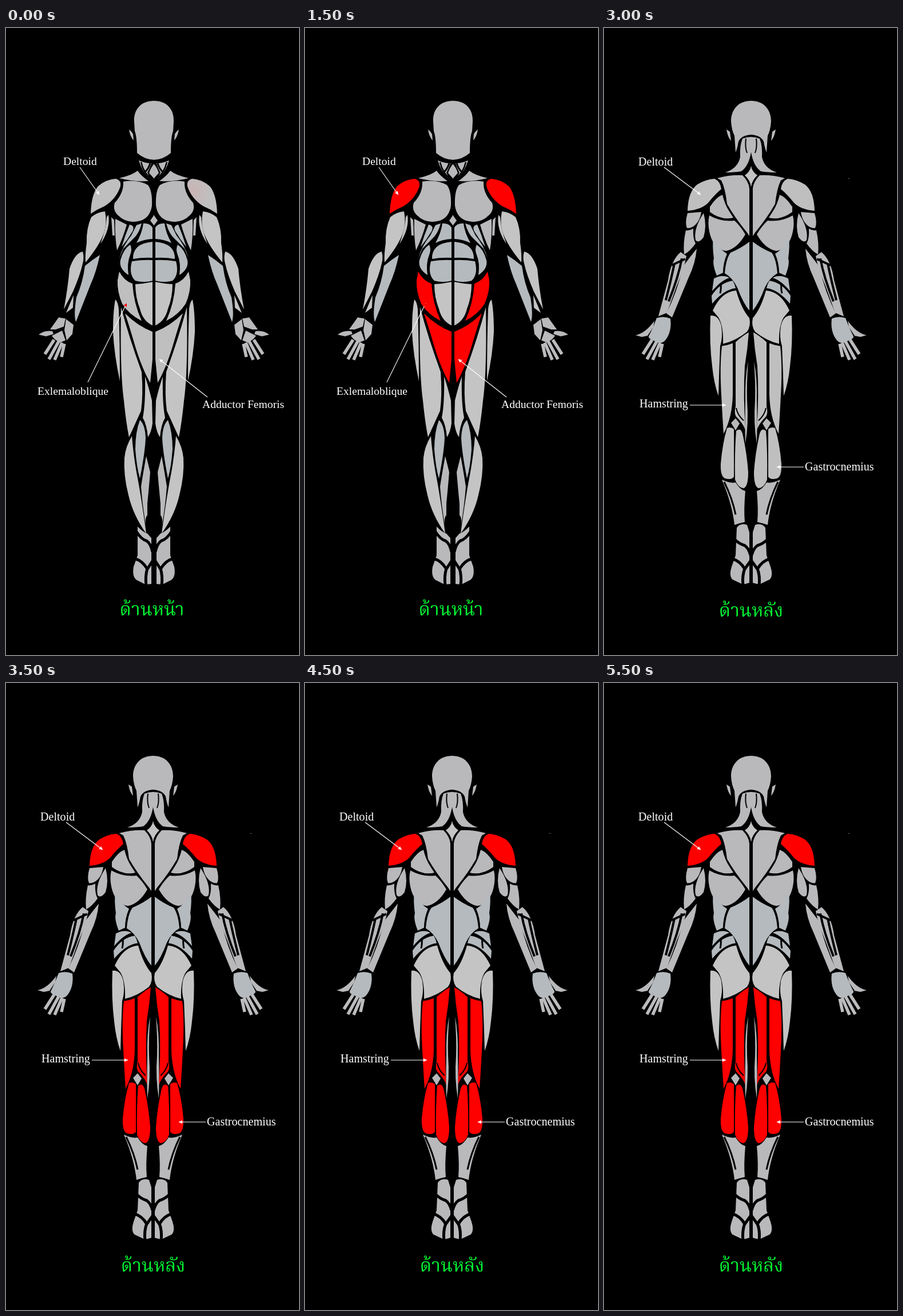
Recreate the animation shown at these times as an HTML page with a canvas. Size 512 px wide and 1094 px high, loop 6 s.

```html
<!DOCTYPE html>
<html lang="th">
<head>
<meta charset="utf-8">
<title>Muscle groups</title>
<style>
html, body { margin: 0; width: 100%; height: 100%; overflow: hidden; background: #000; }
canvas { display: block; width: 100vw; height: 100vh; }
</style>
</head>
<body>
<canvas id="stage" width="512" height="1094"></canvas>
<script>
const ctx = document.getElementById('stage').getContext('2d');
const LOOP = 6000, TURN = 3000, BLINK = 500;
const RED = '#f00', COOL = '#b9b9bc', BLUE = '#b4babe', WARM = '#c4c4c4', REST = '#c0bfc0';

// Each part is one half of the body; it is mirrored about the view's axis.
const fill = (color, d) => ({ color, path: new Path2D(d) });
const hot = d => ({ color: REST, path: new Path2D(d), hot: true });
const line = (width, d, color = '#000') => ({ color, width, path: new Path2D(d) });

const fingers = [
  line(5.5, 'M84 544L68 569M92 547L75 578M98 549L85 579M102 551L97 574', '#bcbcbe')
];

const frontHead = [
  fill(COOL, 'M259 127C236 127 223 142 224 163L225 180Q229 190 229 218Q243 230 259 230Z'),
  fill(COOL, 'M215 177Q219 180 222 185L223 196Q217 190 215 177Z'),
  fill(COOL, 'M232 231Q243 236 254 236Q251 246 247 252L252 264Q238 251 232 231Z'),
  fill(COOL, 'M259 237V263L250 253Q253 243 259 237Z'),
  line(2.5, 'M236 234Q240 252 253 263'),
  line(3, 'M252 236Q249 246 243 251'),
  fill(COOL, 'M198 262Q220 257 230 249Q236 258 249 267Q225 269 198 262Z')
];

const frontArm = [
  hot('M148 324Q149 290 161 276Q175 264 192 263Q202 266 200 276Q193 298 172 311Q160 316 148 324Z'),
  fill(WARM, 'M149 330Q160 321 173 320Q177 340 171 358Q163 380 139 409Q138 395 141 375Q140 350 149 330Z'),
  fill(WARM, 'M179 326Q183 350 165 377Q175 350 176 330Z'),
  fill(WARM, 'M134 390Q137 400 134 411Q130 430 117 460L101 491Q108 455 111 420Q120 393 134 390Z'),
  fill(BLUE, 'M164 396Q158 425 148 447L122 513Q118 500 123 470Q134 445 138 415Q150 405 164 396Z'),
  fill(WARM, 'M118 466L117 488L105 497Z')
];

const frontHand = [
  fill(COOL, 'M77 526L92 505L104 507L101 521L87 526Z'),
  fill(COOL, 'M57 535Q68 527 81 529L83 534L70 538Z'),
  fill(COOL, 'M105 508L118 518L116 534L106 545L102 527Z'),
  fill(COOL, 'M80 537L98 528L104 545L94 549L85 543Z'),
  ...fingers
];

const frontTorso = [
  fill(COOL, 'M205 268Q230 264 248 274Q256 284 255 310Q252 330 236 336Q212 343 196 327Q186 318 190 305Q206 288 205 268Z'),
  fill(COOL, 'M259 326L252 336L259 345Z'),
  fill(COOL, 'M184 330L189 335L190 362L186 362Z'),
  fill(COOL, 'M191 333L211 343Q205 365 194 388Q190 365 191 333Z'),
  fill(BLUE, 'M216 343Q226 345 221 355Q212 370 202 382Q208 362 216 343Z'),
  fill(BLUE, 'M228 344L237 341Q232 360 222 368L205 385L198 402Q204 380 219 362Z'),
  fill(BLUE, 'M217 378Q221 386 217 396Q211 410 214 431Q197 420 200 405Q205 386 217 378Z')
];

const frontAbs = [
  fill(BLUE, 'M240 341Q251 340 256 348V368Q240 369 228 375Q238 357 240 341Z'),
  fill(BLUE, 'M256 373V401Q238 400 222 403Q221 376 256 373Z'),
  fill(BLUE, 'M220 407Q240 404 256 405V441Q241 445 226 441Q214 430 220 407Z'),
  fill(WARM, 'M226 447Q242 446 256 443V519Q239 511 234 490Q226 470 226 447Z'),
  hot('M198 425Q206 441 221 446Q223 480 237 511Q215 500 203 481Q194 460 195 440Z')
];

const frontThigh = [
  hot('M208 498Q230 520 256 530V578L252 619Q238 595 226 556Q217 525 208 498Z'),
  fill(WARM, 'M191 474Q195 476 197 490Q199 550 199 616Q189 570 187 530Q187 495 191 474Z'),
  fill(WARM, 'M201 487Q215 540 237 600Q240 640 236 668Q226 690 215 714Q210 690 206 650Q199 600 201 487Z'),
  fill(WARM, 'M243 608Q249 625 255 650L256 690Q254 705 248 714Q246 692 239 680Q244 655 243 608Z')
];

const frontShin = [
  fill(BLUE, 'M234 684Q243 692 244 715Q243 740 234 786Q228 765 226 735Q226 705 234 684Z'),
  fill(WARM, 'M220 712Q222 740 228 775Q236 815 245 882Q222 850 214 815Q205 780 207 750Q209 730 220 712Z'),
  fill(COOL, 'M245 747L252 775Q250 800 247 830L247 850Q242 855 245 872Q238 830 236 800Q239 780 245 747Z'),
  fill(COOL, 'M230 870Q240 880 247 882L254 890V970L244 971L228 963Q220 957 223 940L230 920Z'),
  line(5, 'M228 879Q236 892 246 895Q253 900 256 914M225 926Q238 929 247 944L256 930M247 943Q243 956 245 973')
];

const backHead = [
  fill(COOL, 'M257.5 127C235 127 222 142 222 163Q223 178 228 188L230 217Q233 210 235 198Q240 187 257.5 186Z'),
  fill(COOL, 'M214 177L220 181L222 197Q216 190 214 177Z'),
  fill(COOL, 'M242 193Q250 190 257.5 190V213Q254 240 240 250Q228 252 212 252Q234 245 238 225Q237 205 242 193Z'),
  line(2, 'M248 193Q246 208 250 218'),
  fill(WARM, 'M257.5 241Q254 252 246 257Q254 264 257.5 277Z')
];

const backArm = [
  hot('M146 319Q147 285 163 273Q178 264 193 263Q203 267 205 281Q195 289 182 305Q170 317 146 319Z'),
  fill(COOL, 'M146 323L170 321Q168 335 160 343Q153 350 145 349Q141 340 146 323Z'),
  fill(COOL, 'M174 323Q180 345 174 365Q165 377 160 370Q156 350 174 323Z'),
  fill(COOL, 'M143 353Q150 354 156 350Q155 367 160 376Q150 390 140 395Q138 375 143 353Z'),
  fill(COOL, 'M134 391L144 398Q140 420 127 450L110 497L95 503L112 440Q117 405 134 391Z'),
  fill(COOL, 'M162 385Q160 410 148 435L119 505L109 498Q128 460 138 416Q150 400 162 385Z'),
  line(4, 'M118 414L142 403M136 402Q130 435 113 477M123 411Q117 440 108 475'),
  fill(BLUE, 'M92 506Q105 502 116 507Q119 530 107 545Q100 553 88 546Q77 542 78 538Q85 525 92 506Z'),
  fill(COOL, 'M55 536Q72 533 88 511L86 522L76 537L66 539Z'),
  ...fingers
];

const backTorso = [
  fill(COOL, 'M198 262Q220 256 242 257Q253 268 254 280V363L250 357Q228 330 215 307Q212 280 205 266Z'),
  fill(COOL, 'M185 312Q196 295 207 291Q211 308 219 320L226 331Q205 336 185 321Z'),
  fill(COOL, 'M184 327Q205 339 228 336Q238 345 247 360Q233 385 213 389Q190 385 184 355Q181 340 184 327Z'),
  fill(BLUE, 'M254 373V493Q243 480 233 453Q224 435 211 428Q213 403 221 392Q240 384 254 373Z'),
  fill(BLUE, 'M191 365Q200 385 215 394Q208 410 208 427L197 432Q189 412 192 402Q189 380 191 365Z'),
  fill(BLUE, 'M192 437Q208 429 219 436Q205 440 189 459Z'),
  fill(BLUE, 'M188 467Q203 444 225 441Q229 448 230 454Q210 456 189 481Z'),
  line(3, 'M204 445Q205 455 203 463'),
  fill(WARM, 'M190 493Q205 460 231 458Q240 490 254 506Q257 520 250 530Q230 546 208 551Q209 520 200 505Z')
];

const backThigh = [
  fill(WARM, 'M186 502Q200 500 205 520Q208 540 203 555Q201 600 200 642Q192 620 189 590Q184 550 186 502Z'),
  hot('M206 555Q215 554 225 550V640Q224 680 209 708Q207 680 205 640Q202 590 206 555Z'),
  hot('M230 548Q242 537 253 531Q251 560 246 590Q243 640 247 701Q243 690 231 678Q227 672 230 660Z'),
  line(2, 'M231 663Q233 675 244 685'),
  fill(COOL, 'M252 582Q249 620 250 650Q253 690 247 725Q246 690 247 650Q246 610 252 582Z'),
  fill(COOL, 'M222 689L230 681L237 690L230 702Z')
];

const backShin = [
  hot('M215 698Q222 695 227 700V783Q223 789 212 786Q203 783 204 760Q207 725 215 698Z'),
  hot('M231 703Q240 695 243 712Q250 745 252 775Q252 800 244 803Q234 802 229 788Q228 740 231 703Z'),
  fill(COOL, 'M206 788Q220 795 230 793Q238 806 247 808Q244 840 246 862Q236 864 228 867Q224 830 206 788Z'),
  line(3, 'M210 792Q224 820 230 849'),
  fill(COOL, 'M232 872Q238 863 250 867L254 880V968L243 971L224 962Q218 955 223 940L230 920Z'),
  line(5, 'M228 892Q236 900 246 903Q253 908 256 920M224 926Q238 930 246 944L256 930M246 943Q241 956 243 973')
];

const front = {
  axis: 258.5, size: 19.6, title: 'ด้านหน้า', titleX: 255, titleY: 1025,
  parts: [frontHead, frontArm, frontHand, frontTorso, frontAbs, frontThigh, frontShin].flat(),
  labels: [
    { text: 'Deltoid', at: [100, 239], from: [129, 243], to: [163, 291] },
    { text: 'Exlemaloblique', at: [55, 640], from: [143, 618], to: [211, 480], tip: RED },
    { text: 'Adductor Femoris', at: [343, 663], from: [352, 644], to: [268, 578] }
  ]
};
const back = {
  axis: 257, size: 20.1, title: 'ด้านหลัง', titleX: 257, titleY: 1027,
  parts: [backHead, backArm, backTorso, backThigh, backShin].flat(),
  labels: [
    { text: 'Deltoid', at: [60, 240], from: [105, 243], to: [169, 291] },
    { text: 'Hamstring', at: [62, 662], from: [150, 658], to: [213, 658] },
    { text: 'Gastrocnemius', at: [351, 772], from: [349, 766], to: [302, 766] }
  ]
};

function drawPart(part, lit) {
  const color = part.hot && lit ? RED : part.color;
  if (part.width) {
    ctx.lineWidth = part.width;
    ctx.strokeStyle = color;
    ctx.stroke(part.path);
  } else {
    ctx.fillStyle = color;
    ctx.fill(part.path);
  }
}

function drawArrow([x0, y0], [x1, y1], tip) {
  const angle = Math.atan2(y1 - y0, x1 - x0);
  ctx.strokeStyle = '#fff';
  ctx.lineWidth = 1.1;
  ctx.beginPath();
  ctx.moveTo(x0, y0);
  ctx.lineTo(x1, y1);
  ctx.stroke();
  ctx.save();
  ctx.translate(x1, y1);
  ctx.rotate(angle);
  ctx.fillStyle = tip;
  ctx.beginPath();
  ctx.moveTo(0, 0);
  ctx.lineTo(-6, -3);
  ctx.lineTo(-6, 3);
  ctx.fill();
  ctx.restore();
}

// Faint blush on the resting right shoulder.
function drawBlush() {
  const glow = ctx.createRadialGradient(192, 285, 0, 192, 285, 34);
  glow.addColorStop(0, 'rgba(225,150,150,.28)');
  glow.addColorStop(1, 'rgba(225,150,150,0)');
  ctx.fillStyle = glow;
  ctx.fill(frontArm[0].path);
}

function drawView(view, lit) {
  for (const mirrored of [false, true]) {
    ctx.save();
    if (mirrored) ctx.transform(-1, 0, 0, 1, 2 * view.axis, 0);
    view.parts.forEach(part => drawPart(part, lit));
    if (mirrored && view === front && !lit) drawBlush();
    ctx.restore();
  }

  ctx.textAlign = 'left';
  ctx.font = `${view.size}px "Liberation Serif", "Noto Serif", serif`;
  for (const { text, at, from, to, tip } of view.labels) {
    drawArrow(from, to, tip || '#fff');
    ctx.fillStyle = '#fff';
    ctx.fillText(text, ...at);
  }

  ctx.textAlign = 'center';
  ctx.font = '300 32px "Noto Sans Thai Looped", "Noto Serif Thai", "Noto Sans Thai", "Noto Sans", sans-serif';
  ctx.fillStyle = '#00f532';
  ctx.fillText(view.title, view.titleX, view.titleY);

  if (view === back) {
    ctx.fillStyle = '#777';
    ctx.fillRect(427, 262, 2, 1);
  }
}

function draw(now) {
  const t = now % LOOP;
  ctx.fillStyle = '#000';
  ctx.fillRect(0, 0, 512, 1094);
  drawView(t < TURN ? front : back, Math.floor(t / BLINK) % 2 === 1);
}

const start = performance.now();
function tick() {
  draw(performance.now() - start);
  requestAnimationFrame(tick);
}
tick();
</script>
</body>
</html>
```
